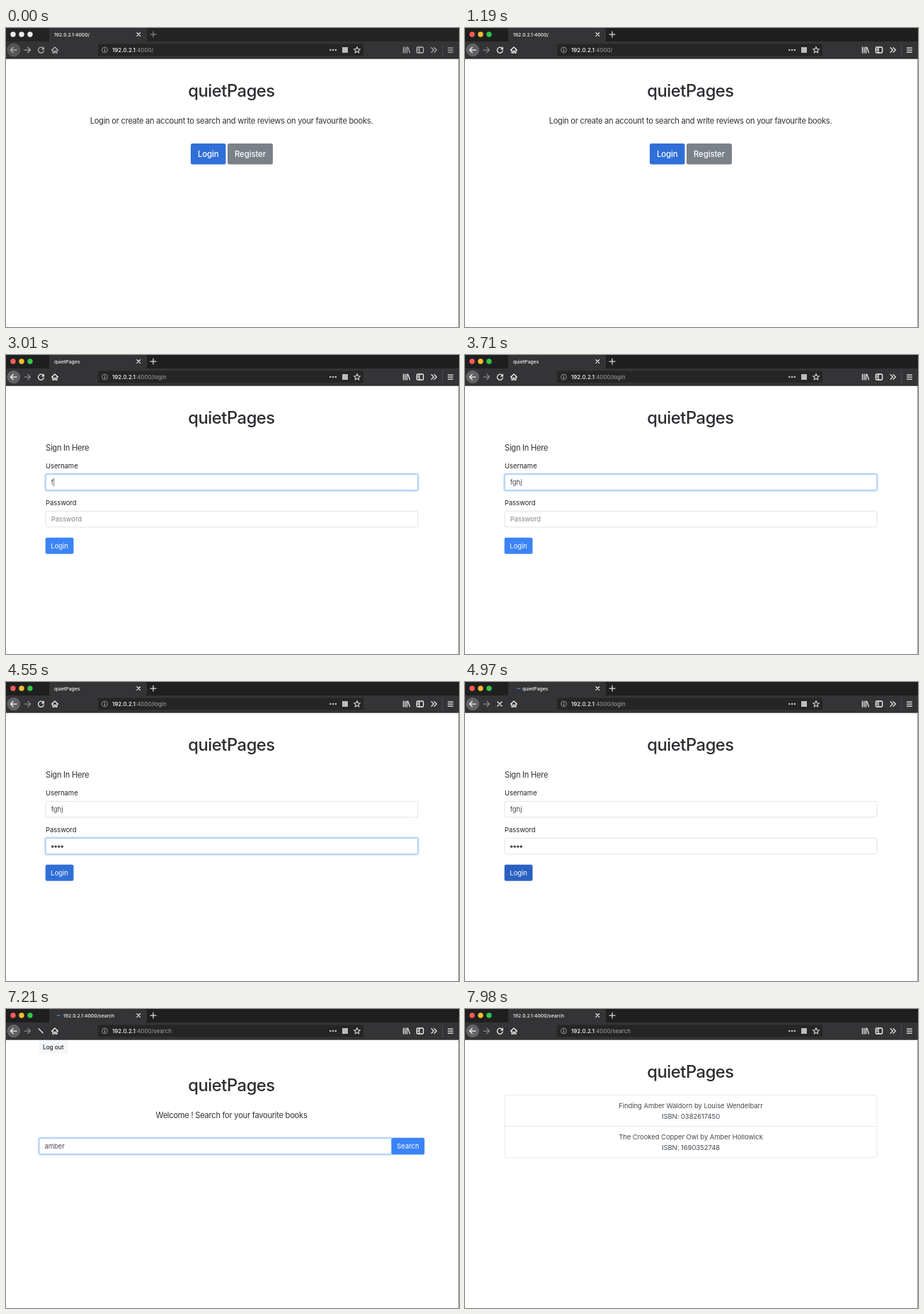
Recreate the animation shown at these times as an HTML page. Size 640x422 px, loop 8.47 s.

```html
<!DOCTYPE html>
<html lang="en">
<head>
<meta charset="utf-8">
<title>Book search demo</title>
<style>
  html, body { margin: 0; width: 100%; height: 100%; overflow: hidden; background: #fff; }
  svg { display: block; width: 640px; height: 422px; font-family: Inter, "Open Sans", sans-serif; }
  text { white-space: pre; }
  .title { font-size: 23.8px; font-weight: 500; letter-spacing: -.5px; fill: #2b2d30; }
  .lead { font-size: 11.2px; letter-spacing: -.28px; fill: #2f3337; }
  .base { font-size: 9.5px; letter-spacing: -.07px; }
  .big { font-size: 11.4px; letter-spacing: -.1px; font-weight: 500; }
  .small { font-size: 8.3px; font-weight: 500; letter-spacing: -.05px; }
  .tab { font-size: 6.8px; font-weight: 500; }
  .url { font-size: 8px; }
  .mid { text-anchor: middle; }
  .icon { fill: none; stroke-width: 1.25; stroke-linecap: round; stroke-linejoin: round; }
</style>
</head>
<body>
<svg id="stage" viewBox="0 0 640 422"></svg>
<script>
const STEP = 70, LOOP = 8470;
const SITE = "quietPages", HOST = "192.0.2.1", PORT = ":4000";
const USER = "fghj", QUERY = "amber";
const BLUE = "#3b84f7", HOVER = "#306fd8", PRESS = "#2a62c2";
const INK = "#212529", VALUE = "#454b51", HINT = "#838990";

const stage = document.getElementById("stage");
const pen = document.createElement("canvas").getContext("2d");
pen.font = '9.5px Inter, "Open Sans", sans-serif';

const textWidth = s => pen.measureText(s).width - .07 * s.length;
const ramp = (t, start, length = 150) => Math.min(1, Math.max(0, (t - start) / length));
const within = (t, a, b) => t >= a && t < b;
const typed = (t, times) => times.filter(k => t >= k).length;

const text = (x, y, s, cls, fill) =>
  `<text x="${x}" y="${y}" class="${cls}"${fill ? ` fill="${fill}"` : ""}>${s}</text>`;
const rect = (x, y, w, h, fill, r = 0, more = "") =>
  `<rect x="${x}" y="${y}" width="${w}" height="${h}" rx="${r}" fill="${fill}" ${more}/>`;
const circle = (x, y, r, fill, more = "") => `<circle cx="${x}" cy="${y}" r="${r}" fill="${fill}" ${more}/>`;
const line = (d, color) => `<path d="${d}" class="icon" stroke="${color}"/>`;
const button = (x, y, w, h, label, fill, cls, baseline) =>
  rect(x, y, w, h, fill, 2.5) + text(x + w / 2, baseline, label, cls + " mid", "#fff");
const heading = y => text(318.5, y, SITE, "title mid");

// Text field; focus runs from 0 to 1
function field({ x, y, w, value = "", hint = "", dots = 0, focus = 0, caret = false }) {
  const tx = x + 8, base = y + 15.3;
  const end = tx + (dots ? dots * 4.5 : textWidth(value)) + .3;
  let out = rect(x - .7, y - .7, w + 1.4, 24.6, "none", 3.2,
    `stroke="#007bff" stroke-opacity="${.22 * focus}" stroke-width="1.7"`);
  out += rect(x + .4, y + .4, w - .8, 22.4, "#fff", 2.2, 'stroke="#d8dce0" stroke-width=".8"');
  out += rect(x + .4, y + .4, w - .8, 22.4, "none", 2.2,
    `stroke="#8dbff5" stroke-opacity="${focus}" stroke-width=".8"`);
  if (dots) for (let i = 0; i < dots; i++) out += circle(tx + 2 + i * 4.5, y + 12.2, 1.75, VALUE);
  else out += text(tx, base, value || hint, "base", value ? VALUE : HINT);
  if (caret) out += rect(end, y + 5.8, .7, 12, "#50555a");
  return out;
}

function browser(t) {
  const active = t >= 1050;
  const icon = active ? "#f4f4f5" : "#b5b5b6", dim = active ? "#88888a" : "#a5a5a6";
  const loading = t === 2380 || within(t, 4900, 5180) || within(t, 6860, 7280);
  const closing = t === 2380 || t === 5110 || t === 7210;
  const path = t < 2380 ? "/" : t < 7210 ? "/login" : "/search";
  const page = within(t, 2380, 5110) ? SITE : HOST + PORT + path;
  const lights = active ? ["#fc5b57", "#fdbc2e", "#32c748"] : ["#eee", "#eee", "#eee"];

  let out = rect(0, 0, 640, 20, active ? "#1f1f20" : "#242425") + rect(0, 19, 640, 24.4, "#343436")
    + rect(61, 0, 137, 20, "#343436") + rect(198, 2, .7, 15, "#454547")
    + rect(0, 42.6, 640, .8, "#202021");
  lights.forEach((c, i) => out += circle(10 + 12 * i, 9, 3.7, c));
  if (loading) out += rect(72.3 + Math.sin((t - 2380) / 130), 8.5, 4.8, 1.5, "#3584e4", .7);
  out += text(loading ? 81 : 68, 11.6, page, "tab", "#f4f4f5");
  out += line("M185 6.8l4.6 4.6m0-4.6l-4.6 4.6", "#f4f4f5") + line("M204 9h8m-4-4v8", active ? "#ddd" : "#858586");

  // Navigation
  out += circle(10.8, 31, 8.8, active ? "#626264" : "#555557", 'stroke="#777779" stroke-width=".6"');
  out += line("M15 31H6.5m3.7-3.7L6.5 31l3.7 3.7", icon) + line("M26 31h8.5m-3.7-3.7l3.7 3.7-3.7 3.7", dim);
  if (closing) out += line("M46 27.6l6 6.2", icon);
  else if (loading) out += line("M46 28l6 6m0-6l-6 6", icon);
  else out += line("M52.6 28.7A4 4 0 1 0 53.4 32.2", icon) + `<path d="M54 26.2v4.2h-4.2z" fill="${icon}"/>`;
  out += line("M64.5 31.2l4.5-4.2 4.5 4.2M66 30.4V35h2.1v-2.7h1.8V35H72v-4.6", icon);

  // Address bar
  out += rect(130, 22.5, 375, 17, "#252526", 2);
  out += circle(139.5, 31, 3.9, "none", 'stroke="#aaa" stroke-width=".8"') + line("M139.5 30.8v2.1m0-4v.1", "#aaa");
  out += `<text x="150" y="34" class="url" fill="#a4a4a6"><tspan fill="#fafafa" font-weight="500">${HOST}</tspan>${PORT + path}</text>`;
  for (let i = 0; i < 3; i++) out += circle(458.3 + 3.8 * i, 31, 1.25, "#c8c8c9");
  out += rect(475, 27, 8, 8, "#bdbdbe");
  let star = "";
  for (let i = 0; i < 10; i++) {
    const r = i % 2 ? 2.1 : 4.7, a = i * Math.PI / 5;
    star += (i ? "L" : "M") + (496 + r * Math.sin(a)).toFixed(2) + " " + (31.2 - r * Math.cos(a)).toFixed(2);
  }
  out += line(star + "Z", "#c8c8c9");

  // Right-hand tools
  out += line("M561.5 27v8m2.5-8v8m2.5-8v8m1.4-7.7l2.5 7.5", icon);
  out += rect(580.4, 27, 9.2, 8, "none", 1.3, `stroke="${icon}" stroke-width="1.3"`) + line("M584 27.5v7m-2-5h.6m-.6 2h.6", icon);
  out += line("M601 27.6l3.3 3.4-3.3 3.4m4-6.8l3.3 3.4-3.3 3.4", icon);
  out += rect(616, 22, .7, 18, "#555557") + line("M624.5 28h6.8m-6.8 3h6.8m-6.8 3h6.8", icon);
  return out;
}

function welcome(t) {
  return heading(96.7)
    + text(318.5, 134.8, "Login or create an account to search and write reviews on your favourite books.", "lead mid")
    + button(261, 163, 49.5, 29.5, "Login", within(t, 1960, 2240) ? PRESS : HOVER, "big", 182.2)
    + button(313, 163, 64, 29.5, "Register", "#7a8188", "big", 182.2);
}

function login(t) {
  const moved = ramp(t, 3710);
  const fill = t >= 4620 ? PRESS : t >= 4410 ? HOVER : BLUE;
  return heading(96.7) + text(56, 134.8, "Sign In Here", "lead")
    + text(56, 159.9, "Username", "base", INK)
    + field({
        x: 55.7, y: 168, w: 526.5, hint: "Username",
        value: USER.slice(0, typed(t, [3010, 3080, 3150, 3290])),
        focus: ramp(t, 2450) - moved, caret: within(t, 2590, 3570)
      })
    + text(56, 211.9, "Password", "base", INK)
    + field({
        x: 55.7, y: 220, w: 526.5, hint: "Password", dots: typed(t, [3990, 4060, 4130, 4200]),
        focus: moved - ramp(t, 4550), caret: within(t, 3780, 4480)
      })
    + button(55.7, 257.8, 39.8, 23, "Login", fill, "base", 272.7);
}

function search(t) {
  return rect(47, 43.4, 40, 18.8, "#f5f6f7", 2) + text(52, 56.5, "Log out", "small", INK)
    + heading(115.5) + text(318.5, 153.6, "Welcome ! Search for your favourite books", "lead mid")
    + field({
        x: 46.5, y: 182, w: 499, hint: "Enter title, author, or ISBN",
        value: QUERY.slice(0, typed(t, [5810, 5880, 5950, 6020, 6160])),
        focus: ramp(t, 5180), caret: within(t, 5250, 6440)
      })
    + button(544.5, 181.8, 46.8, 23.6, "Search", BLUE, "base", 197.4);
}

function results() {
  const rows = [
    ["Finding Amber Waldorn by Louise Wendelbarr", "0382617450"],
    ["The Crooked Copper Owl by Amber Hollowick", "1690352748"]
  ];
  return heading(96.7)
    + rect(56.1, 121.6, 525.8, 88, "#fff", 2.4, 'stroke="#e4e4e4" stroke-width=".8"')
    + rect(56, 165.1, 526, .8, "#e4e4e4")
    + rows.map(([book, code], i) => text(319, 140 + 44.2 * i, book, "base mid", VALUE)
        + text(319, 154.5 + 44.2 * i, "ISBN: " + code, "base mid", VALUE)).join("");
}

let shown = -1;
function draw(now) {
  const t = Math.floor(now % LOOP / STEP) * STEP;
  if (t !== shown) {
    shown = t;
    const page = t < 2450 ? welcome : t < 5180 ? login : t < 7280 ? search : results;
    stage.innerHTML = rect(0, 0, 640, 422, "#fff") + page(t) + browser(t) + rect(639.2, 43.4, .8, 379, "#777");
  }
}

const start = performance.now();
function tick() {
  draw(performance.now() - start);
  requestAnimationFrame(tick);
}
tick();
</script>
</body>
</html>
```
